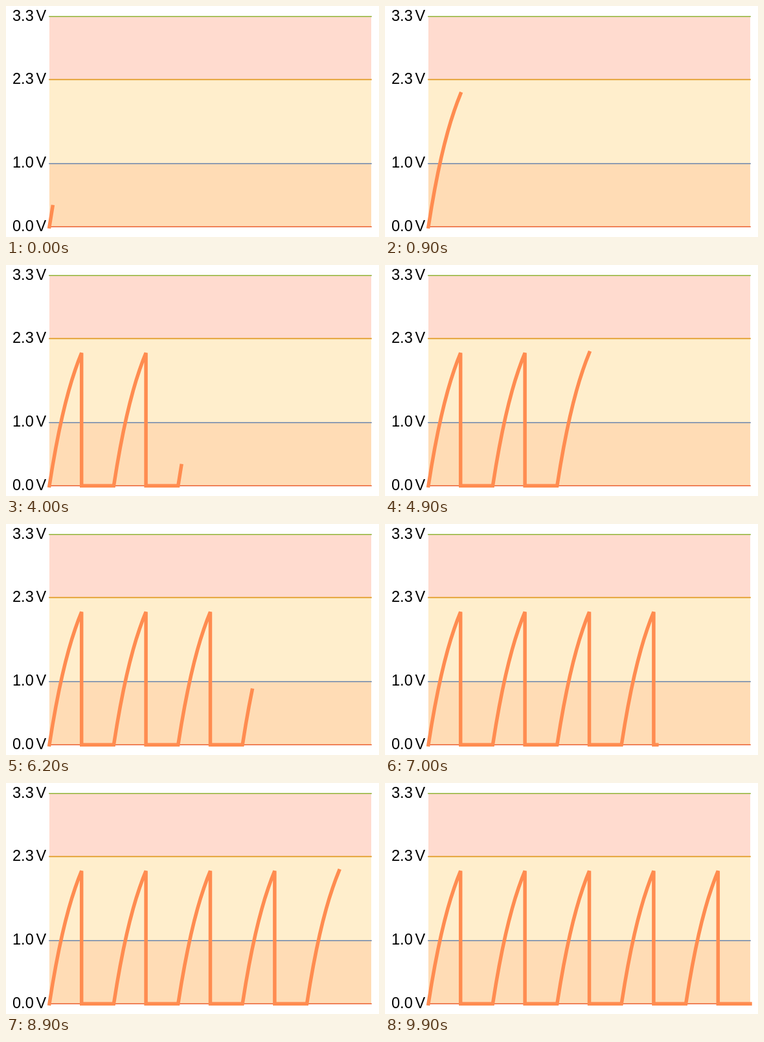
An HTML page for the animation above (10 s loop, 576x356 px).

```html
<!DOCTYPE html>
<html lang="en">
<head>
<meta charset="utf-8">
<title>Sawtooth voltage</title>
<style>
  html, body { margin: 0; width: 100%; height: 100%; overflow: hidden; background: #fff; }
  svg { display: block; width: 576px; height: 356px; }
  text { font: 23.5px "Liberation Sans", Arial, sans-serif; text-anchor: end; }
  .level { stroke-width: 1.6; stroke-linecap: square; }
  #trace { fill: none; stroke: #ff8c50; stroke-width: 5.5; stroke-linecap: square; stroke-linejoin: miter; }
</style>
</head>
<body>
<svg viewBox="0 0 576 356">
  <rect x="67" y="16.2" width="497" height="97.2" fill="#ffdbcf"/>
  <rect x="67" y="113.4" width="497" height="129.6" fill="#ffeecc"/>
  <rect x="67" y="243" width="497" height="97.2" fill="#ffdcb5"/>

  <path class="level" d="M67 16.2H564" stroke="#8fb032"/>
  <path class="level" d="M67 113.4H564" stroke="#e19c24"/>
  <path class="level" d="M67 242.9H564" stroke="#7f93b0"/>
  <path class="level" d="M67 340.2H564" stroke="#eb6235"/>

  <text x="62.3" y="23">3.3<tspan dx="3.9">V</tspan></text>
  <text x="62.3" y="120">2.3<tspan dx="3.9">V</tspan></text>
  <text x="62.3" y="249">1.0<tspan dx="3.9">V</tspan></text>
  <text x="62.3" y="347">0.0<tspan dx="3.9">V</tspan></text>

  <path id="trace"/>
</svg>
<script>
  const STEP_MS = 100, STEPS = 100, HALF = 10;
  const LEFT = 67, BASE = 340.2, DX = 4.97, FULL = 324;
  const trace = document.getElementById('trace');
  let shown = -1;

  const xAt = n => (LEFT + n * DX).toFixed(2);

  // Capacitor charge after n steps, as a height on the stage
  const yAt = n => (BASE - FULL * (1 - Math.exp(-n / HALF))).toFixed(2);

  function outline(count) {
    let d = `M${LEFT} ${BASE}`;
    for (let start = 0; start < count; start += 2 * HALF) {
      const rise = Math.min(HALF, count - start);
      for (let n = 1; n <= rise; n++) d += `L${xAt(start + n)} ${yAt(n)}`;
      if (count > start + HALF) {
        d += `V${BASE}H${xAt(Math.min(count, start + 2 * HALF))}`;
      }
    }
    return d;
  }

  function draw() {
    const step = Math.floor(performance.now() / STEP_MS) % STEPS;
    if (step !== shown) {
      trace.setAttribute('d', outline(step + 1));
      shown = step;
    }
    requestAnimationFrame(draw);
  }
  draw();
</script>
</body>
</html>
```
